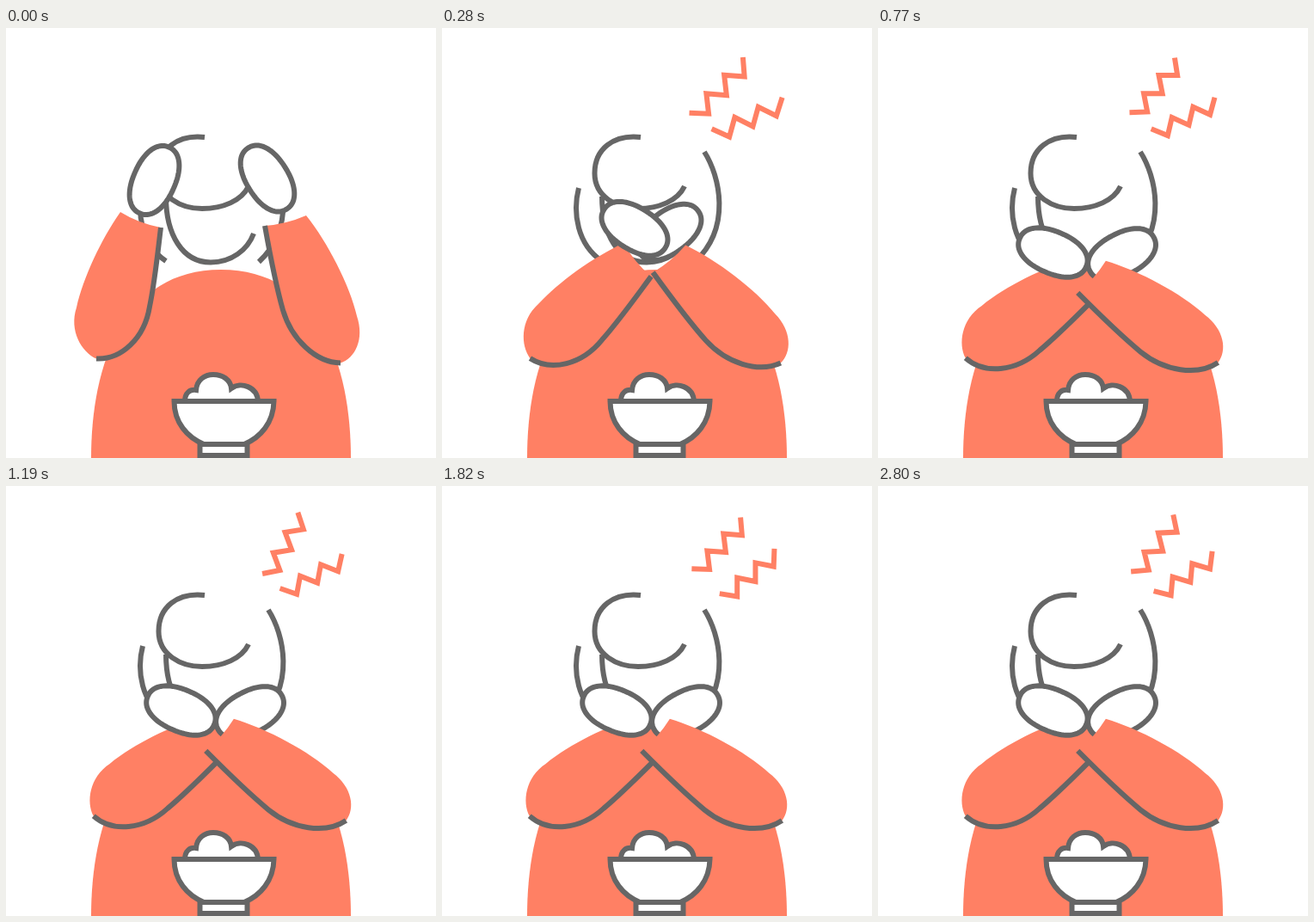
Recreate the animation shown at these times as an HTML page with a canvas. Size 500x500 px, loop 2870 ms.

```html
<!DOCTYPE html>
<html lang="en">
<head>
<meta charset="utf-8">
<title>Weary diner</title>
<style>
  html, body { margin: 0; width: 100%; height: 100%; overflow: hidden; background: #fff; }
  canvas { display: block; width: 100vmin; height: 100vmin; }
</style>
</head>
<body>
<canvas id="stage" width="500" height="500"></canvas>
<script>
const ctx = document.getElementById('stage').getContext('2d');
const LOOP = 2870, STEP = 70;
const CORAL = '#ff8064', GREY = '#666666', WHITE = '#ffffff';
const RAD = Math.PI / 180;

const path = d => new Path2D(d);

const body = path('M99 500C99 391 137 281 250 281C363 281 401 391 401 500Z');
const head = [
  'M231 127C199 123.5 177.5 141 177.5 169C177.5 196 203 210 228 210C252 210 274 201 282 184',
  'M186 196C186 240 205 272.5 238 272.5C262 272.5 281 258 288 239',
  'M159 186C151.5 215 157.5 252 186 271',
  'M305 144C323 172 337 232 294 272'
].map(path);
const rice = path('M208 434C208 424 214 420 221 421C222 409 231 403 241 403' +
  'C252 403 261 409 262 419C273 411 292 417 293 434');
const bowl = path('M195.5 434C195.5 459 211 476 230 484H277C296 476 311 459 311.5 434Z');
const rim = path('M193 434H314');
const foot = path('M225.5 484H280.5V497H225.5Z');

// Each arm is rigid and turns about its elbow.
const leftArm = {
  pivot: [104.4, 379.5], hand: [172.5, 177, -66],
  sleeve: path('M180 232Q154 227 133 214C110 247 90 290 82 325C73 352 88 377 105 384.5' +
    'C134 386 161 361 167 324C173 295 176 265 180 232Z'),
  seam: path('M180 232C176 265 173 295 167 324C161 361 134 386 105 384.5')
};
const rightArm = {
  pivot: [391.4, 379], hand: [304, 175, 58],
  sleeve: path('M301 230Q326 228 349 218C374 249 400 300 408 335C417 362 406 384 389 389.5' +
    'C360 389 332 362 322 328C314 300 306 258 301 230Z'),
  seam: path('M301 230C306 258 314 300 322 328C332 362 360 389 389 389.5')
};

// Keys are [time, value] pairs, eased in and out between neighbours.
const leftTurn = [[0, 0], [490, 49], [690, 38.4]];
const rightTurn = [[0, 0], [490, -42.5], [690, -34.7]];
const pop = [[0, 0], [210, 1.14], [340, 1.05], [560, 0.98], [700, 1]];
const tiltA = [[680, -46], [1000, -69], [1500, -41], [1640, -41], [2030, -53.4]];
const tiltB = [[680, -24], [1000, -36], [1380, -22], [1720, -41], [2030, -34.3]];

function tween(keys, t) {
  if (t <= keys[0][0]) return keys[0][1];
  for (let i = 1; i < keys.length; i++) {
    const [t0, v0] = keys[i - 1], [t1, v1] = keys[i];
    if (t < t1) {
      const p = (t - t0) / (t1 - t0);
      return v0 + (v1 - v0) * p * p * (3 - 2 * p);
    }
  }
  return keys[keys.length - 1][1];
}

function fill(shape, color) {
  ctx.fillStyle = color;
  ctx.fill(shape);
}

function line(shape, color = GREY) {
  ctx.strokeStyle = color;
  ctx.stroke(shape);
}

function outlined(shape) {
  fill(shape, WHITE);
  line(shape);
}

function roundedOval(a, b) {
  const shape = new Path2D(), power = 2 / 2.2;
  const bend = v => Math.sign(v) * Math.abs(v) ** power;
  for (let i = 0; i < 96; i++) {
    const w = i / 96 * 2 * Math.PI;
    shape.lineTo(a * bend(Math.cos(w)), b * bend(Math.sin(w)));
  }
  shape.closePath();
  return shape;
}
const hand = roundedOval(42, 24.3);

function drawArm(arm, angle) {
  const [px, py] = arm.pivot, [hx, hy, tilt] = arm.hand;
  ctx.save();
  ctx.translate(px, py);
  ctx.rotate(angle * RAD);
  ctx.translate(-px, -py);
  ctx.save();
  ctx.translate(hx, hy);
  ctx.rotate(tilt * RAD);
  outlined(hand);
  ctx.restore();
  fill(arm.sleeve, CORAL);
  line(arm.seam);
  ctx.restore();
}

function drawZigzag(x, y, angle, size) {
  if (size <= 0) return;
  const shape = new Path2D();
  for (let i = 0; i < 7; i++) {
    const v = i % 2 ? 15.5 : (i % 6 ? -1.2 : 0);
    shape.lineTo((41.2 - 13.73 * i) * size, v * size);
  }
  ctx.save();
  ctx.translate(x, y);
  ctx.rotate(angle * RAD);
  line(shape, CORAL);
  ctx.restore();
}

function draw(t) {
  ctx.fillStyle = WHITE;
  ctx.fillRect(0, 0, 500, 500);
  ctx.lineWidth = 6;
  ctx.lineJoin = 'miter';
  head.forEach(s => line(s));
  fill(body, CORAL);
  drawArm(leftArm, tween(leftTurn, t));
  drawArm(rightArm, tween(rightTurn, t));
  outlined(rice);
  outlined(foot);
  outlined(bowl);
  line(rim);
  const size = tween(pop, t);
  drawZigzag(318.7, 66.4, tween(tiltA, t), size);
  drawZigzag(354.6, 99, tween(tiltB, t), size);
}

const start = performance.now();
function tick() {
  const t = (performance.now() - start) % LOOP;
  draw(Math.floor(t / STEP) * STEP);
  requestAnimationFrame(tick);
}
tick();
</script>
</body>
</html>
```
